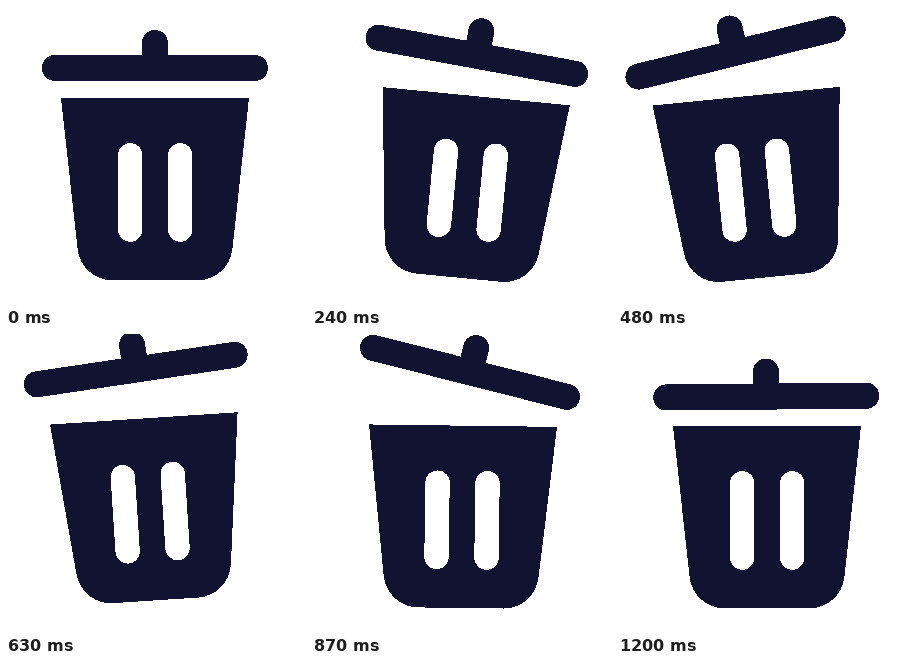
An HTML page for the animation above (2230 ms loop, 300 by 300 pixels).

```html
<!DOCTYPE html>
<html lang="en">
<head>
<meta charset="utf-8">
<title>Trash bin</title>
<style>
html, body { margin: 0; width: 100%; height: 100%; overflow: hidden; background: #fff; }
svg { display: block; fill: #121331; stroke-width: 26; stroke-linecap: round; }
.slots { stroke: #fff; stroke-width: 24.4; }
#lid { stroke: #121331; }
</style>
</head>
<body>
<svg width="300" height="300" viewBox="0 0 300 300" shape-rendering="crispEdges">
  <g id="body">
    <path d="M55 92H243L226.4 243.1A35 35 0 0 1 191.6 274.3H106.4A35 35 0 0 1 71.6 243.1Z"/>
    <path class="slots" d="M124.2 149.3V223.6M174.2 149.3V223.6"/>
  </g>
  <path id="lid" d="M49 62H249M149 37V62"/>
</svg>
<script>
const LOOP = 2230, STEP = 30, END = 1200;
const body = document.getElementById('body');
const lid = document.getElementById('lid');

// Sine easing from one turning point [ms, value] to the next
function swing(...turns) {
  return t => {
    let from = [0, 0];
    for (const to of turns) {
      if (t < to[0]) {
        const u = (t - from[0]) / (to[0] - from[0]);
        return from[1] + (to[1] - from[1]) * (1 - Math.cos(Math.PI * u)) / 2;
      }
      from = to;
    }
    return from[1];
  };
}

// Smooth bump from 0 to 1 and back
function hump(t, from, to) {
  return t > from && t < to ? Math.sin(Math.PI * (t - from) / (to - from)) ** 2 : 0;
}

const bodyTilt = swing([255, 5.6], [510, -6.1], [820, 1.1], [1050, -2.1], [1200, 0]);
const lidTilt = swing([255, 10.5], [515, -14.9], [885, 14.3], [1060, -1.1], [1320, 0]);
const lidX = swing([255, 16], [505, -32.6], [835, 10], [1060, -7], [1240, 0]);
const lidY = swing([255, -12.3], [400, -12.5], [690, -28], [795, -28], [1060, -4.6], [1200, 0.6]);

function pose(part, x, y, tilt, pivotY) {
  part.setAttribute('transform', `translate(${x} ${y}) rotate(${tilt} 149 ${pivotY})`);
}

function draw(t) {
  const tilt = bodyTilt(t);
  const slip = -5.2 * hump(t, 240, 690);
  const hop = 6.5 * hump(t, 500, 800);
  // The lower corner stays on the ground while the bin tips
  pose(body, slip, -hop - 0.45 * Math.abs(tilt), tilt, 250);
  pose(lid, lidX(t), lidY(t), lidTilt(t), 62);
}

let start;
function tick(now) {
  start ??= now;
  const t = (now - start) % LOOP;
  draw(Math.min(END, Math.floor(t / STEP) * STEP));
  requestAnimationFrame(tick);
}
draw(0);
requestAnimationFrame(tick);
</script>
</body>
</html>
```
